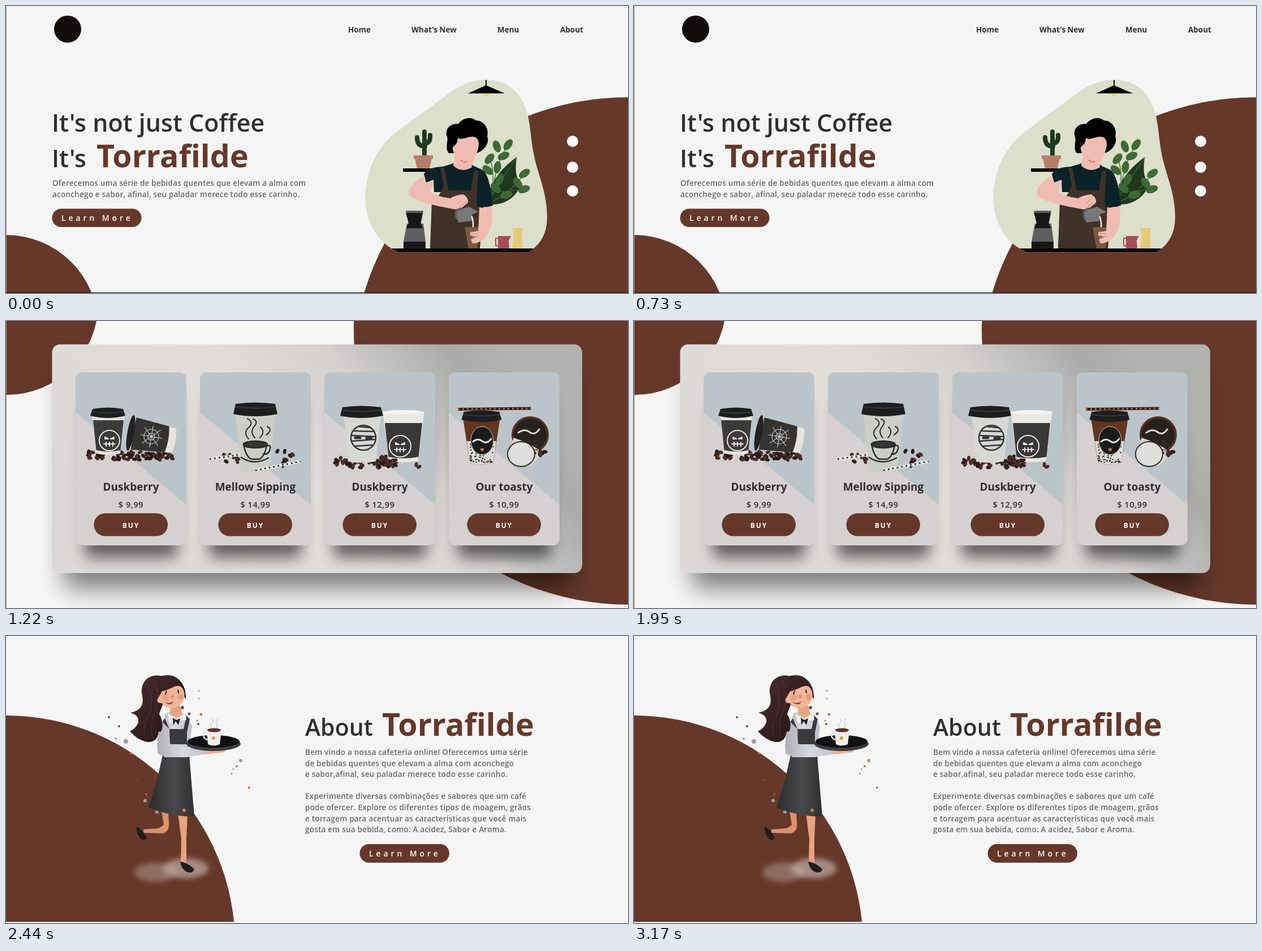
An HTML page that plays this animation: 1100x509 px, repeating every 3660 ms.

```html
<!DOCTYPE html>
<html lang="pt">
<head>
<meta charset="utf-8">
<title>Coffee shop</title>
<style>
  html, body { margin: 0; width: 100%; height: 100%; overflow: hidden; background: #f5f5f5; }
  svg { display: block; width: 100vw; height: 100vh; }
  text { font-family: "Open Sans", "Noto Sans", sans-serif; fill: #2f2f31; }
  .scene { visibility: hidden; }
  .nav { font-size: 13.5px; font-weight: 700; }
  .copy { font-size: 13.5px; font-weight: 600; letter-spacing: .22px; fill: #6b6869; }
  .head { font-size: 43px; font-weight: 600; }
  .brand { font-size: 55.5px; font-weight: 700; fill: #65382a; }
  .more { font-size: 14px; font-weight: 600; letter-spacing: 4.9px; fill: #fff; }
  .title { font-size: 19px; font-weight: 700; text-anchor: middle; }
  .price { font-size: 14.5px; font-weight: 600; letter-spacing: .6px; text-anchor: middle; }
  .buy { font-size: 12px; font-weight: 700; letter-spacing: 2px; fill: #fff; text-anchor: middle; }
  .brown { fill: #65382a; }
  .line { fill: none; stroke-linecap: round; stroke-linejoin: round; }
</style>
</head>
<body>
<svg viewBox="0 0 1100 509" preserveAspectRatio="none">
  <defs>
    <linearGradient id="panel" gradientUnits="userSpaceOnUse" x1="300" y1="520" x2="880" y2="60">
      <stop offset="0" stop-color="#dcd8d6"/>
      <stop offset=".45" stop-color="#e2dedb"/>
      <stop offset=".68" stop-color="#d3d0ce"/>
      <stop offset=".9" stop-color="#aaaba9"/>
      <stop offset="1" stop-color="#b1b1af"/>
    </linearGradient>
    <linearGradient id="hair" x2="1" y2="1">
      <stop offset="0" stop-color="#4a2d2e"/><stop offset="1" stop-color="#211317"/>
    </linearGradient>
    <linearGradient id="skirt" x2="1">
      <stop offset="0" stop-color="#2c2c2e"/><stop offset=".55" stop-color="#49494b"/><stop offset="1" stop-color="#303032"/>
    </linearGradient>
    <linearGradient id="blouse" x2="1">
      <stop offset="0" stop-color="#aeafb3"/><stop offset=".5" stop-color="#d9dadd"/><stop offset="1" stop-color="#bfc0c4"/>
    </linearGradient>
    <filter id="soft" x="-30%" y="-60%" width="160%" height="220%"><feGaussianBlur stdDeviation="13"/></filter>
    <filter id="wide" x="-20%" y="-30%" width="140%" height="160%"><feGaussianBlur stdDeviation="21"/></filter>
    <filter id="haze" x="-30%" y="-60%" width="160%" height="220%"><feGaussianBlur stdDeviation="5"/></filter>
    <clipPath id="card"><rect width="196" height="307" rx="12"/></clipPath>
    <clipPath id="blob"><path d="M849 131C885 131 907 150 919 181C929 208 927 240 936 275C945 310 957 335 957 375C957 402 946 423 925 436H693C658 420 640 388 636 352C632 303 653 252 690 224C717 204 744 184 771 164C796 146 815 131 849 131Z"/></clipPath>
  </defs>

  <g class="scene" id="home">
    <rect width="1100" height="509" fill="#f5f5f5"/>
    <circle class="brown" cx="0" cy="569" r="163"/>
    <circle class="brown" cx="1099" cy="648" r="486"/>
    <circle cx="109" cy="41" r="24" fill="#120d0c"/>
    <text class="nav" x="605" y="47">Home</text>
    <text class="nav" x="717" y="47">What's New</text>
    <text class="nav" x="869" y="47">Menu</text>
    <text class="nav" x="980" y="47">About</text>
    <text class="head" x="81" y="223">It's not just Coffee</text>
    <text class="head" x="81" y="286">It's</text>
    <text class="brand" x="160" y="286">Torrafilde</text>
    <text class="copy" x="82" y="319">Oferecemos uma série de bebidas quentes que elevam a alma com</text>
    <text class="copy" x="82" y="339">aconchego e sabor, afinal, seu paladar merece todo esse carinho.</text>
    <rect class="brown" x="81.5" y="359.5" width="158" height="32.5" rx="16"/>
    <text class="more" x="98" y="381">Learn More</text>
    <g fill="#fff"><circle cx="1002" cy="240" r="10"/><circle cx="1002" cy="286" r="10"/><circle cx="1002" cy="328" r="10"/></g>

    <g clip-path="url(#blob)">
      <rect x="630" y="125" width="335" height="315" fill="#dcdfc9"/>
      <ellipse cx="849" cy="155" rx="6" ry="5" fill="#e9dc57"/>
      <path d="M848 130h2v11l32 14h-65l31-14z"/>
      <path class="line" d="M740 264V223M741 249Q727 249 727 233M741 244Q751 243 750 229" stroke="#1c3a20" stroke-width="8"/>
      <path d="M723 270h30l-4 18h-22zM721 265h34v6h-34z" fill="#b67e68"/>
      <rect x="702" y="288" width="60" height="6"/>

      <path d="M903 268C872 291 852 318 852 351C878 356 904 340 910 316C900 301 901 288 903 268Z" fill="#20381f"/>
      <path class="line" d="M852 350Q868 320 903 269M856 348Q866 303 857 274M861 325Q867 276 890 243M858 347Q889 335 916 298M876 330L918 325" stroke="#3c6637" stroke-width="1.3"/>
      <g id="leaves" fill="#3d6a35"></g>

      <path d="M753 347L750 430H838L845 345Z" fill="#3e3229"/>
      <path d="M739 298Q746 286 772 285L795 278L826 283L843 291Q856 300 861 354Q848 359 833 355L830 330H757L756 308Q747 312 743 313Z" fill="#0b2229"/>
      <path d="M737 302Q709 321 713 335Q718 347 796 361L805 342Q771 342 749 330L757 311Q749 314 743 313Z" fill="#f0bcb1"/>
      <path d="M775 287L783 327H822L828 292L835 293L832 350L838 430H750L754 350Q771 331 774 318L768 287Z" fill="#3e3229"/>
      <path d="M737 302Q709 321 713 335Q718 347 796 361L805 342Q771 342 749 330L757 311Q749 314 743 313Z" fill="#f0bcb1"/>
      <path d="M792 282L785 299H824L826 283L820 277H798Z" fill="#0b2229"/>
      <path d="M796 253L791 283Q805 297 824 286L823 260Z" fill="#f0bcb1"/>
      <path d="M783 261C775 251 784 238 779 229C777 215 788 208 800 209C807 199 822 195 831 203C846 203 855 219 851 231C856 242 846 257 832 261Z"/>
      <path d="M799 234C809 240 820 227 832 234C838 240 837 250 831 265C827 276 821 286 812 286C800 285 794 267 790 254C789 246 798 250 799 234Z" fill="#f0bcb1"/>
      <path class="line" d="M804 273Q810 278 815 276" stroke="#dc7774" stroke-width="2"/>
      <path d="M787 340Q797 335 809 334Q819 341 817 349L801 362L787 356Z" fill="#f0bcb1"/>
      <path d="M794 364L819 356L835 365L824 370L826 381L800 384Z" fill="#78777a"/>
      <path class="line" d="M804 359Q791 363 797 378" stroke="#5b5a5d" stroke-width="3"/>
      <path class="line" d="M799 351l8-8M803 356l11-9" stroke="#bd817a"/>
      <path class="line" d="M824 374Q827 383 826 393" stroke="#f8eee9" stroke-width="2.5"/>
      <path d="M811 392H838L834 430H818Z" fill="#7a593c"/>
      <path d="M837 357Q849 360 859 354Q863 376 855 399Q844 421 825 421L822 414L833 409L821 407V401L835 399L836 382Z" fill="#f0bcb1"/>
      <path class="line" d="M823 403l12 1M824 410l12-1" stroke="#c68a80"/>

      <path d="M707 363H738L734 386H738L742 418V430H703V418L709 386H712Z" fill="#5e5e60"/>
      <path d="M707 367H737L733 384L737 394H708L712 384ZM703 418H742V430H703Z" fill="#171719"/>
      <path d="M870 408H893L889 416L890 430H870Z" fill="#a84c58"/>
      <path d="M869 412H866V425H870" class="line" stroke="#a84c58" stroke-width="2"/>
      <path d="M895 394H915L912 405L914 430H895L898 405Z" fill="#e3cb78"/>
      <rect x="630" y="430" width="330" height="7"/>
    </g>
    <rect width="1" height="509" fill="#b9925d"/>
    <rect y="508" width="1100" height="1" fill="#111"/>
  </g>

  <g class="scene" id="shop">
    <rect width="1100" height="509" fill="#f5f5f4"/>
    <circle class="brown" cx="1" cy="-31" r="162"/>
    <circle class="brown" cx="1101" cy="17" r="486"/>
    <rect x="102" y="95" width="898" height="380" rx="14" opacity=".48" filter="url(#wide)"/>
    <rect x="81.5" y="41.5" width="937.5" height="405.5" rx="14" fill="url(#panel)"/>
    <g id="cards"></g>
    <g id="products"></g>
    <rect width="1" height="509" fill="#b9925d"/>
  </g>

  <g class="scene" id="about">
    <rect width="1100" height="509" fill="#f5f5f5"/>
    <circle class="brown" cx="0" cy="546" r="405"/>
    <rect y="507" width="1100" height="2" fill="#fafafa"/>
    <g id="splashes"></g>
    <g filter="url(#haze)" fill="#c8b5ae">
      <ellipse cx="265" cy="419" rx="38" ry="17" opacity=".42"/>
      <ellipse cx="318" cy="412" rx="40" ry="18" opacity=".65"/>
    </g>
    <path d="M304 314L310 360L309 402H319L319 360L321 315Z" fill="#e9a27e"/>
    <path d="M275 310L279 335L270 341L243 343V349L277 350Q290 347 288 330L287 312Z" fill="#dd916c"/>
    <path d="M231 338Q240 341 249 358Q244 365 239 360Q230 351 231 338ZM308 400Q319 401 333 413Q332 421 321 419Q310 414 308 400Z" fill="#1e1d20"/>
    <path d="M277 211H324L333 320Q291 321 252 304Q267 260 277 211Z" fill="url(#skirt)"/>
    <path d="M282 137Q301 129 320 140L329 160L322 215H280L268 193Z" fill="url(#blouse)"/>
    <path d="M281 146L289 165H314L319 142L325 147L320 171V192H283V166L276 153Z" fill="#3a3a3c"/>
    <path d="M275 151Q265 181 268 207Q273 217 324 214L355 209L351 200L306 196L290 191L289 165Z" fill="url(#blouse)"/>
    <path d="M351 200L375 202L390 199L387 206L354 210Z" fill="#edaf91"/>
    <path d="M289 120L291 140L304 145L312 138L306 119Z" fill="#e8a482"/>
    <path d="M286 137L300 148L316 137L319 149L302 151L289 155Z" fill="#eeeeef"/>
    <path d="M295 145L301 149L308 146L305 158L300 151L296 158Z" fill="#222225"/>
    <path d="M275 71C252 66 238 82 240 101C245 122 239 132 220 136Q236 141 234 153Q230 164 219 169Q233 185 250 188C262 189 269 182 270 169C278 175 279 149 271 139C273 129 280 120 281 108C299 104 310 97 318 112C320 87 303 63 275 71Z" fill="url(#hair)"/>
    <path d="M276 98C287 97 299 86 308 89C318 96 318 113 309 121C299 131 280 129 276 119Q266 120 268 112Z" fill="#f1b69a"/>
    <circle cx="282" cy="109" r="6" fill="#e68769" opacity=".5"/><circle cx="309" cy="108" r="5" fill="#e68769" opacity=".55"/>
    <path class="line" d="M284 98l-2 5M304 96l1 5" stroke="#352025" stroke-width="2"/>
    <circle cx="294" cy="107" r="3" fill="#dc8f70"/>
    <path d="M280 117Q289 121 296 116Q292 126 280 117Z" fill="#a93229"/>
    <path class="line" d="M250 84Q264 112 252 144Q240 158 247 177M263 78Q273 106 263 137Q253 158 259 181" stroke="#68484a" opacity=".6"/>
    <ellipse cx="367" cy="191" rx="48" ry="13" fill="#3d3d3f"/>
    <ellipse cx="367" cy="187" rx="46" ry="11" fill="#111113"/>
    <path class="line" d="M356 171Q347 168 350 179Q352 185 358 183" stroke="#e6e4e1" stroke-width="2.5"/>
    <path d="M355 167H381L378 192Q367 197 357 192Z" fill="#f0eeeb"/>
    <ellipse cx="368" cy="167" rx="12" ry="3.5" fill="#5a3025"/>
    <path class="line" d="M364 164Q359 158 365 154Q368 150 364 146M372 163Q376 157 371 153Q376 149 374 146" stroke="#b9b8b6"/>
    <circle cx="367" cy="181" r="3" fill="#d59b42"/><circle cx="315" cy="309" r="3" fill="#bd813b"/>

    <text class="head" x="529" y="177" style="font-size:41px">About</text>
    <text class="brand" x="665" y="177">Torrafilde</text>
    <g id="story"></g>
    <rect class="brown" x="625.5" y="369" width="158.5" height="33" rx="16.5"/>
    <text class="more" x="642" y="391">Learn More</text>
  </g>
</svg>
<script>
const byId = id => document.getElementById(id);

function seeded(seed) {
  return () => (seed = seed * 16807 % 2147483647) / 2147483647;
}

const leaves = [
  [855, 271, 40], [868, 249, -20], [888, 246, 35], [880, 266, 65], [869, 286, 10], [852, 291, -50],
  [873, 308, 25], [866, 323, -45], [885, 335, 75], [905, 314, -35], [917, 297, 55], [916, 325, 70]
];
byId("leaves").innerHTML = leaves.map(([x, y, turn]) =>
  `<ellipse cx="${x}" cy="${y}" rx="6.5" ry="11" transform="rotate(${turn} ${x} ${y})"/>`).join("");

const items = [["Duskberry", "9,99"], ["Mellow Sipping", "14,99"], ["Duskberry", "12,99"], ["Our toasty", "10,99"]];
byId("cards").innerHTML = items.map(([title, price], i) => `
  <g transform="translate(${123 + 220 * i} 91)">
    <rect x="16" y="45" width="164" height="284" rx="12" opacity=".55" filter="url(#soft)"/>
    <g clip-path="url(#card)">
      <rect width="196" height="307" fill="#d4d1d0"/>
      <path d="M0 0H196V235L0 71Z" fill="#bbc5c9"/>
    </g>
    <text class="title" x="98" y="210">${title}</text>
    <text class="price" x="98" y="240">$ ${price}</text>
    <rect class="brown" x="32.5" y="250" width="130.5" height="40.5" rx="20"/>
    <text class="buy" x="98" y="276">BUY</text>
  </g>`).join("");

// Tapered band of a cup, wide at the top.
function taper(x, top, bottom, wide, narrow, fill) {
  return `<path d="M${x - wide / 2} ${top}H${x + wide / 2}L${x + narrow / 2} ${bottom}Q${x} ${bottom + 5} ${x - narrow / 2} ${bottom}Z" fill="${fill}"/>`;
}

function lid(x, y, width, height) {
  const half = width / 2;
  return `<path d="M${x - half + 4} ${y + 2}Q${x} ${y - 3} ${x + half - 4} ${y + 2}L${x + half} ${y + height - 3}Q${x} ${y + height + 5} ${x - half} ${y + height - 3}Z" fill="#1d1e20"/>
    <path class="line" d="M${x - half + 4} ${y + 7}Q${x} ${y + 12} ${x + half - 4} ${y + 7}" stroke="#505155"/>`;
}

function beans(seed, left, right, top, bottom, count) {
  const random = seeded(seed);
  return Array.from({ length: count }, () => {
    const x = left + random() * (right - left), y = top + random() * (bottom - top);
    return `<ellipse cx="${x}" cy="${y}" rx="4.5" ry="3" fill="${random() < .5 ? "#2b1917" : "#4b2d27"}" transform="rotate(${random() * 180} ${x} ${y})"/>`;
  }).join("");
}

function speckles(seed, left, right, top, bottom, count) {
  const random = seeded(seed);
  return Array.from({ length: count }, () =>
    `<circle cx="${left + random() * (right - left)}" cy="${top + random() * (bottom - top)}" r="1.3" fill="#38352f"/>`).join("");
}

function face(x, y, r) {
  return `<g transform="translate(${x} ${y})" class="line" stroke="#e9e8e2" stroke-width="2">
    <circle r="${r}"/><path d="M-8 -6l6 3h-6zM8 -6l-6 3h6z" fill="#e9e8e2"/>
    <path d="M-10 6H10M-6 3v7M0 3v7M6 3v7"/></g>`;
}

function straw(path, base, stripe) {
  return `<path d="${path}" stroke="${base}" stroke-width="5"/><path d="${path}" stroke="${stripe}" stroke-width="3" stroke-dasharray="3 5"/>`;
}

const darkPair = beans(11, 146, 294, 232, 246, 65)
  + taper(181, 166, 235, 57, 42, "#e5e4df") + taper(181, 176, 229, 54, 43, "#3d3b39")
  + lid(180, 154, 62, 17) + face(183, 212, 18)
  + `<g transform="translate(257 205) rotate(-80)">
      ${taper(0, -37, 41, 60, 44, "#e7e4dc")}${taper(0, -32, 28, 58, 47, "#353433")}
      <ellipse cy="-37" rx="32" ry="6" fill="#222224"/>
      <g class="line" stroke="#d9d8d2">
        <circle r="6"/><circle r="13"/><path d="M-19 0H19M0 -19V19M-14 -14L14 14M-14 14L14 -14"/>
      </g></g>`;

const paperCup = beans(23, 385, 425, 238, 252, 10) + beans(8, 480, 515, 229, 265, 8)
  + straw("M360 245L414 237", "#efefeb", "#343434")
  + taper(441, 162, 266, 72, 49, "#cbcdc7") + lid(441, 145, 78, 23)
  + `<g class="line" stroke="#292a29" stroke-width="2.5">
      <path d="M420 218Q424 241 434 245H448Q459 239 461 218M459 222Q472 217 465 232Q462 237 455 236M416 242Q438 257 464 243"/>
      <ellipse cx="441" cy="219" rx="21" ry="6" fill="#353635"/>
      <path d="M429 209Q419 198 429 189T427 173M440 207Q431 197 439 187T437 174M449 207Q459 197 450 188M460 202Q473 193 462 187" stroke-width="2"/>
    </g>` + straw("M441 265L521 249", "#efefeb", "#343434");

const whitePair = beans(35, 583, 690, 239, 260, 58) + beans(17, 725, 735, 239, 261, 3)
  + taper(630, 164, 249, 67, 48, "#d7d8d3") + lid(629, 151, 76, 20)
  + `<g class="line" stroke="#343533" stroke-width="2.5">
      <circle cx="632" cy="207" r="22"/><path d="M616 195L649 196M612 203L653 205M612 213L653 210M617 222L648 220M623 187L643 189"/>
      <path d="M618 207h8M638 208h8" stroke-width="5"/>
    </g>`
  + taper(703, 163, 248, 73, 51, "#e9e8e1") + taper(703, 181, 241, 66, 53, "#393836")
  + `<ellipse cx="703" cy="162" rx="37" ry="4" fill="#f4f3ed"/>` + face(697, 222, 19)
  + beans(90, 660, 690, 246, 260, 12);

const brownPair = taper(841, 171, 252, 66, 41, "#62351f")
  + taper(841, 213, 252, 52, 41, "#dddbd5") + speckles(44, 821, 861, 216, 251, 95)
  + lid(841, 159, 71, 19)
  + `<ellipse cx="842" cy="212" rx="20" ry="25" fill="#1b1b1b" stroke="#c8c5bd"/>
     <path class="line" d="M826 214Q834 207 842 213T858 209" stroke="#eeeae3" stroke-width="3"/>
     <circle cx="842" cy="228" r="3" fill="#bf6840"/>`
  + straw("M799 156.5L929 155", "#26201e", "#d76136")
  + `<circle cx="927" cy="202" r="33" fill="#54301f"/><circle cx="927" cy="202" r="29" fill="#252220"/>
     <path class="line" d="M906 198Q917 190 926 197T943 192" stroke="#dfd9cf" stroke-width="3"/>
     <path d="M898 207Q926 216 949 233L931 256Q900 262 888 234Z" fill="#d5d3ce"/>`
  + speckles(52, 900, 942, 212, 240, 55)
  + `<ellipse cx="911" cy="236" rx="24" ry="22" fill="#e0dedc" stroke="#33302d" stroke-width="2"/>`
  + beans(29, 944, 957, 231, 239, 4);

byId("products").innerHTML = darkPair + paperCup + whitePair + brownPair;

const splashes = {
  "#71503f": [[182, 144, 2], [200, 160, 2], [324, 138, 2.5], [312, 127, 3], [340, 156, 2]],
  "#c27a43": [[221, 208, 2], [345, 139, 2.5], [338, 150, 1.5], [408, 231, 2], [399, 244, 1.5], [430, 269, 2], [248, 281, 1.5], [230, 256, 1]],
  "#a69b97": [[212, 187, 4], [194, 182, 2], [341, 97, 1.5], [341, 111, 1.5], [415, 221, 3], [402, 236, 1.5], [246, 292, 3], [267, 312, 3]]
};
byId("splashes").innerHTML = Object.entries(splashes).map(([color, dots]) =>
  dots.map(([x, y, r]) => `<circle cx="${x}" cy="${y}" r="${r}" fill="${color}"/>`).join("")).join("");

const story = [
  "Bem vindo a nossa cafeteria online! Oferecemos uma série",
  "de bebidas quentes que elevam a alma com aconchego",
  "e sabor,afinal, seu paladar merece todo esse carinho.",
  "",
  "Experimente diversas combinações e sabores que um café",
  "pode ofercer. Explore os diferentes tipos de moagem, grãos",
  "e torragem para acentuar as características que você mais",
  "gosta em sua bebida, como: A acidez, Sabor e Aroma."
];
byId("story").innerHTML = story.map((line, i) =>
  `<text class="copy" x="529" y="${211 + 19.6 * i}">${line}</text>`).join("");

const scenes = ["home", "shop", "about"].map(byId);
const HOLD = 1220;

function draw() {
  const current = Math.floor(performance.now() / HOLD) % scenes.length;
  scenes.forEach((scene, i) => { scene.style.visibility = i === current ? "visible" : "hidden"; });
  requestAnimationFrame(draw);
}
draw();
</script>
</body>
</html>
```
